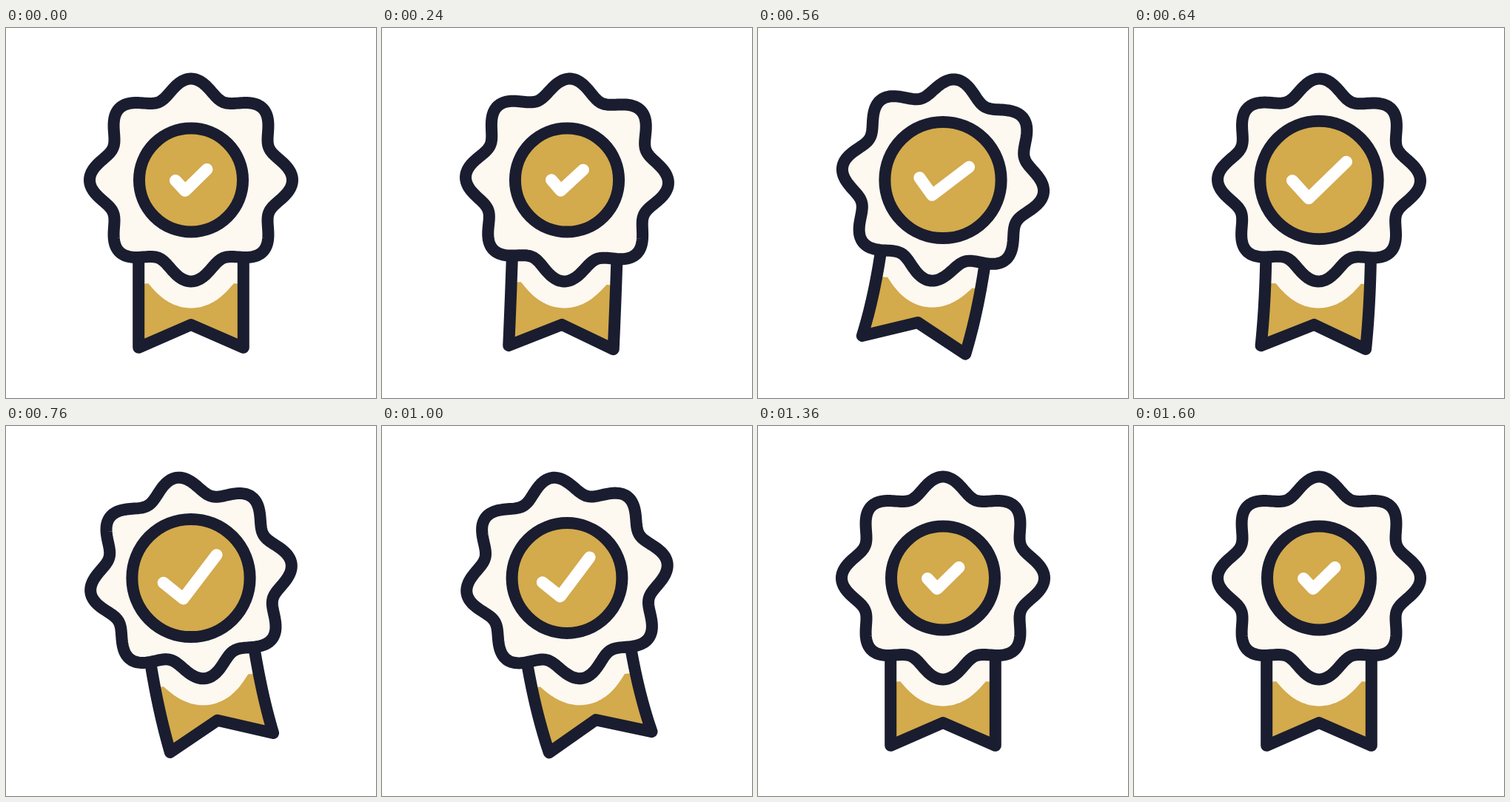
Write an HTML page that moves like this. It is 500 px wide and 500 px high and loops after 1720 ms.

```html
<!DOCTYPE html>
<html lang="en">
<head>
<meta charset="utf-8">
<title>Award ribbon</title>
<style>
  html, body { margin: 0; width: 100%; height: 100%; overflow: hidden; background: #fff; }
  svg { display: block; width: 100%; height: 100%; }
  .line { fill: none; stroke: #1a1d2f; stroke-width: 16; stroke-linejoin: round; stroke-linecap: round; }
  .cream { fill: #fdf8f0; }
  .gold { fill: #d3aa4c; }
  .shade { stroke: #fdf8f0; stroke-width: 72; stroke-linejoin: round; }
  .tick { stroke: #fff; }
</style>
</head>
<body>
<svg viewBox="0 0 500 500">
  <defs>
    <clipPath id="tailClip"><path class="tail"/></clipPath>
  </defs>
  <g transform="translate(250 205.5)">
    <path class="tail gold"/>
    <g clip-path="url(#tailClip)"><path class="rosette cream shade"/></g>
    <path class="tail line"/>
    <path class="rosette line cream"/>
    <circle id="disc" class="line gold" r="70"/>
    <path id="tick" class="line tick"/>
  </g>
</svg>
<script>
const LOOP = 1720, STEP = 40;
const TAIL_HALF = 70.8, TAIL_TOP = 80, TAIL_END = 226.3, NOTCH = 195.5;

const all = sel => [...document.querySelectorAll(sel)];
const tails = all('.tail'), rosettes = all('.rosette');
const disc = document.getElementById('disc'), tick = document.getElementById('tick');

// Eased 0 to 1 between two times; a higher p gives a steeper middle.
function ramp(t, start, end, p) {
  const x = Math.min(1, Math.max(0, (t - start) / (end - start)));
  return x ** p / (x ** p + (1 - x) ** p);
}

const turnAt = t => 8.7 * (ramp(t, 40, 540, 3.3) - 2 * ramp(t, 403, 883, 3.3) + ramp(t, 910, 1310, 3.3));
const bendAt = t => 0.34 * turnAt(t - 40);
const discAt = t => 70 + 9.8 * (ramp(t, 200, 700, 2.1) - ramp(t, 680, 1290, 2.1));
const tickAt = t => 1 + 0.8 * (ramp(t, 280, 770, 2.1) - ramp(t, 800, 1340, 2.1));

const toPath = pts => 'M' + pts.map(p => p.map(n => n.toFixed(2)).join(' ')).join('L');

function rotate([x, y], deg) {
  const r = deg * Math.PI / 180, c = Math.cos(r), s = Math.sin(r);
  return [x * c - y * s, x * s + y * c];
}

function rosettePath() {
  const pts = [];
  for (let i = 0; i < 360; i++) {
    const a = i * Math.PI / 180, r = 125.5 + 11.5 * Math.cos(8 * a);
    pts.push([r * Math.cos(a), r * Math.sin(a)]);
  }
  return toPath(pts) + 'Z';
}

// The tail swings with the rosette and curls towards its free end.
function tailPath(turn, bend) {
  const side = [];
  for (let k = 0; k <= 20; k++) side.push(TAIL_TOP + (TAIL_END - TAIL_TOP) * k / 20);
  const pts = [
    ...side.map(y => [-TAIL_HALF, y]),
    [0, NOTCH],
    ...side.reverse().map(y => [TAIL_HALF, y])
  ];
  const curl = y => bend * ((y - TAIL_TOP) / (TAIL_END - TAIL_TOP)) ** 1.6;
  return toPath(pts.map(p => rotate(p, turn + (p[0] ? curl(p[1]) : bend)))) + 'Z';
}

function draw(t) {
  const turn = turnAt(t), size = tickAt(t);
  const tail = tailPath(turn, bendAt(t));
  tails.forEach(el => el.setAttribute('d', tail));
  rosettes.forEach(el => el.setAttribute('transform', `rotate(${turn})`));
  disc.setAttribute('r', discAt(t));
  const mark = [[-21, .5], [-8, 14.5], [21.5, -14.5]];
  tick.setAttribute('d', toPath(mark.map(([x, y]) => rotate([x * size, y * size], turn))));
}

const outline = rosettePath();
rosettes.forEach(el => el.setAttribute('d', outline));

const begin = performance.now();
function play() {
  const t = (performance.now() - begin) % LOOP;
  draw(Math.floor(t / STEP) * STEP);
  requestAnimationFrame(play);
}
draw(0);
requestAnimationFrame(play);
</script>
</body>
</html>
```
